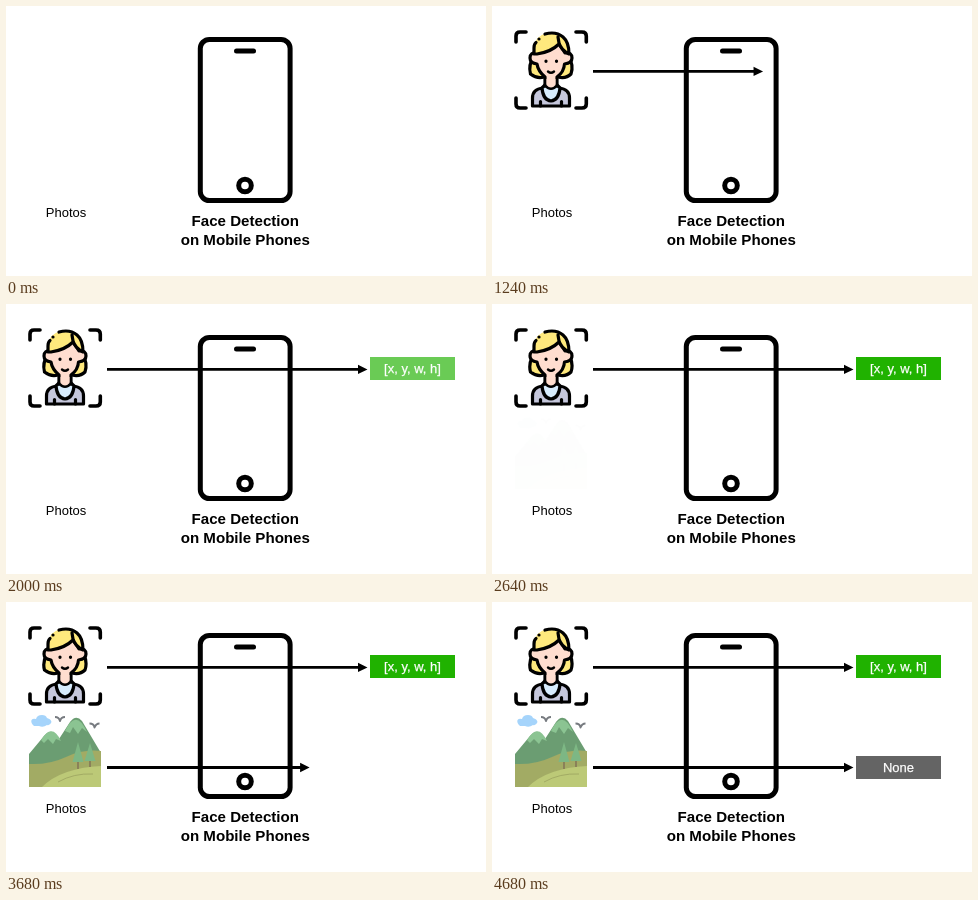
An HTML page for the animation above (4.84 s loop, 480 by 270 pixels).

```html
<!DOCTYPE html>
<html lang="en">
<head>
<meta charset="utf-8">
<title>Face Detection on Mobile Phones</title>
<style>
  html, body { margin: 0; width: 100%; height: 100%; overflow: hidden; background: #fff; }
  svg { display: block; width: 100vw; height: 100vh; }
  text { font: 13px "Liberation Sans", Arial, sans-serif; text-anchor: middle; }
  .title { font-size: 15.1px; font-weight: bold; }
  .label { fill: #fff; stroke: #fff; stroke-width: .25; }
  .ink { stroke: #000; stroke-width: 3.2; stroke-linecap: round; stroke-linejoin: round; }
  .line { fill: none; }
</style>
</head>
<body>
<svg viewBox="0 0 480 270">
  <g fill="none" stroke="#000" stroke-width="5" stroke-linecap="round">
    <rect x="194.3" y="33.5" width="89.8" height="161" rx="9"/>
    <path d="M230.5 45H247.5"/>
    <circle cx="239" cy="179.5" r="6.3"/>
  </g>
  <text class="title" x="239.3" y="220">Face Detection</text>
  <text class="title" x="239.3" y="239">on Mobile Phones</text>
  <text x="60" y="211">Photos</text>

  <g id="portrait" class="ink">
    <path class="line" stroke-width="3.6" d="M24 36V30Q24 26 28 26H34M84 26H90Q94.3 26 94.3 30V36M24 92V98Q24 102 28 102H34M84 102H90Q94.3 102 94.3 98V92"/>
    <path fill="#ffe97d" d="M42 50Q36 59 38.5 68Q45 73 52 71H66Q74 73 79 68Q82 59 76.5 50Z"/>
    <path fill="#ffddcf" d="M45 47Q38 46 38 52Q38 57 45 58Q46 65 53 71V81L59 87L65 81V71Q72 66 72.500 58Q80 57 80 52Q80 46 73 47L66 36Z"/>
    <path fill="#c5c7dc" d="M40.500 100V92Q40.500 83 51 82H67Q77.500 83 77.500 92V100Z"/>
    <path fill="#d7ecfd" d="M50 82L53 79Q59 86 65 79L68 82Q67 94 59 95Q51 94 50 82Z"/>
    <path fill="#ffddcf" stroke="none" d="M54.500 73H63.500V79Q59 84 54.500 79Z"/>
    <path fill="#ffe97d" stroke="none" d="M42 48V41Q43 30 55 27H62Q77 29 77 42V48Q69 45 67 38Q59 47 46 48Z"/>
    <path class="line" d="M42 48V42Q42 38 44 36.500M53 28Q64 25 71 31Q77 36 77 48Q69 44 67 37L66 31M67 38Q59 46 45 48H42M48.500 95.500V100M69.500 95.500V100M47 33h.01"/>
    <path class="line" stroke-width="2.4" d="M56 65.500Q59 68 62 65.500"/>
    <path class="line" d="M54 55v.3M64.500 55v.3"/>
  </g>

  <g id="landscape">
    <path fill="#a5d4fb" d="M28 124Q24.500 121 25.500 118Q27 116 30 117Q31 113 36 113Q40 113 41 116Q45 117 45.500 120Q44 124 41 123Q37 126 33 124Z"/>
    <path fill="none" stroke="#777b80" stroke-width="2" stroke-linejoin="round" d="M49 115Q53 115 54 119Q55 115 59 115M83.500 121.500Q88 121.500 88.500 125.500Q90 121.500 93.500 121.500"/>
    <path fill="#6b9d72" d="M23 152L38 134Q46 124 53 137L64 120Q70 112 76 119L95 151V168H23Z"/>
    <path fill="#8bc492" d="M35 138Q46 120 55 139L50 137L47 142L42 137L38 141ZM59 129Q70 106 81 130L76 126L72 132L67 125L64 131Z"/>
    <path fill="#a2ab64" d="M23 162Q43 163 60 155Q77 147 95 149V185H23Z"/>
    <path fill="#bcc977" d="M36 185Q55 166 95 164V185Z"/>
    <path stroke="#806f55" stroke-width="1.4" d="M72 157V167M84 156V165"/>
    <path fill="#7db784" d="M72 140L77.500 160H66.500ZM84 141L89.500 159H78.500Z"/>
    <path fill="none" stroke="#a2ab64" stroke-width="1" d="M52 180Q68 171 87 172"/>
  </g>

  <g id="found">
    <rect x="364" y="53" width="85" height="23" fill="#20b200"/>
    <text class="label" x="406.500" y="69">[x, y, w, h]</text>
  </g>
  <g id="none">
    <rect x="364" y="154" width="85" height="23" fill="#636363"/>
    <text class="label" x="406.500" y="170">None</text>
  </g>
  <path id="upper"/>
  <path id="lower"/>
</svg>
<script>
const LOOP = 4840, STEP = 40, FADE = 680, DRAW = 480;
const LEFT = 101, REACH = 260.5, HEAD = 9.5;
const el = id => document.getElementById(id);

const easeInOut = u => u < .5 ? 2 * u * u : 1 - 2 * (1 - u) ** 2;
const progress = (t, start, length) =>
  easeInOut(Math.min(1, Math.max(0, (t - start) / length)));

const fades = { portrait: 160, found: 1600, landscape: 2600, none: 4040 };
const arrows = { upper: [960, 65.4], lower: [3360, 165.5] };

function arrowPath(y, p) {
  if (p === 0) return "";
  const tip = LEFT + REACH * p;
  const base = Math.max(LEFT, tip - HEAD);
  const half = 4.7 * (tip - base) / HEAD;
  return `M${LEFT} ${y - 1.4}H${base}V${y - half}L${tip} ${y}L${base} ${y + half}V${y + 1.4}H${LEFT}Z`;
}

function draw(t) {
  for (const [id, start] of Object.entries(fades))
    el(id).setAttribute("opacity", progress(t, start, FADE));
  for (const [id, [start, y]] of Object.entries(arrows))
    el(id).setAttribute("d", arrowPath(y, progress(t, start, DRAW)));
}

const origin = performance.now();
function tick() {
  const t = (performance.now() - origin) % LOOP;
  draw(Math.floor(t / STEP) * STEP);
  requestAnimationFrame(tick);
}
draw(0);
tick();
</script>
</body>
</html>
```
